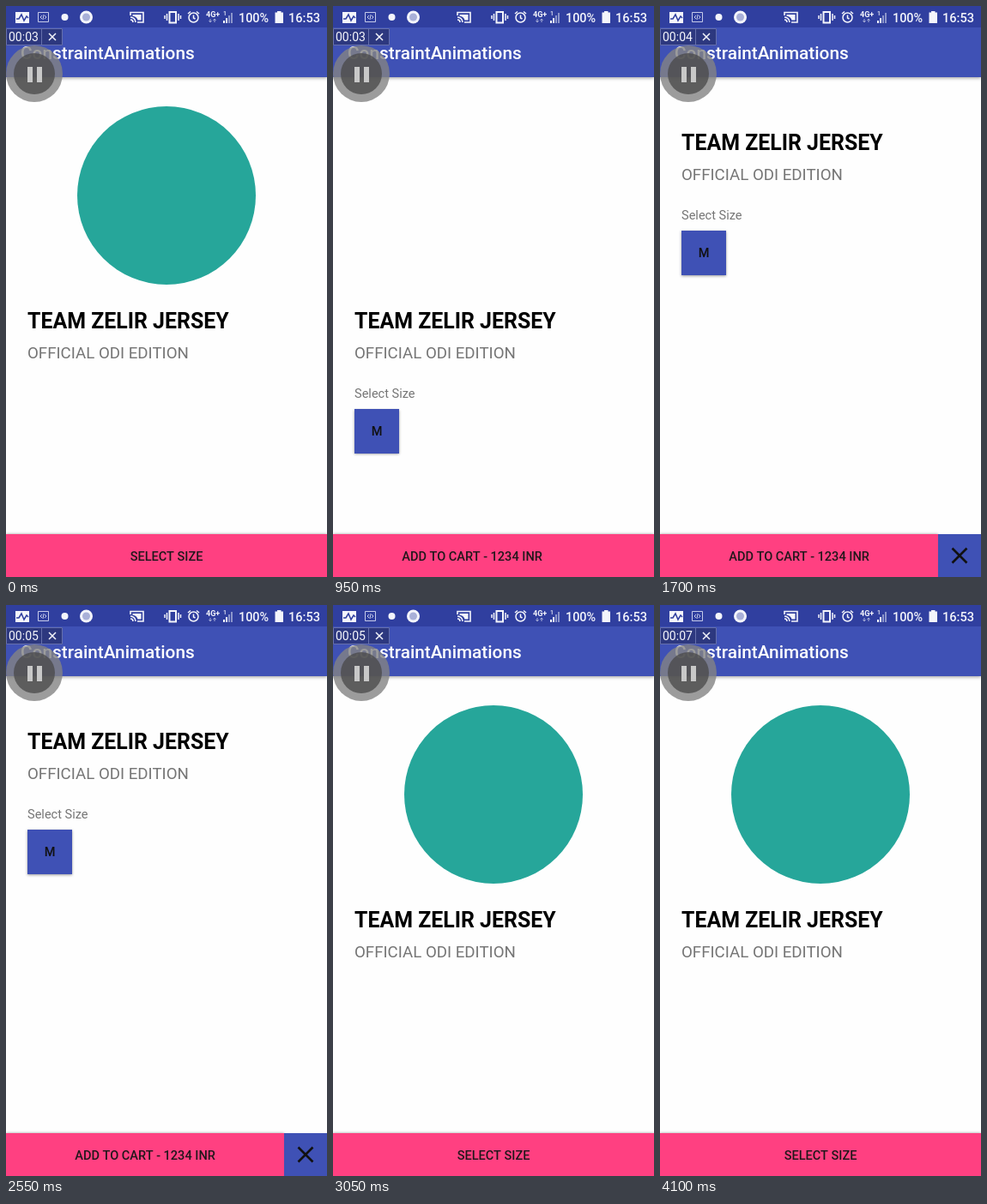
Animation, 374 px wide and 666 px high, one loop 4300 ms. Source, as an HTML page with a canvas:

```html
<!DOCTYPE html>
<html lang="en">
<head>
<meta charset="utf-8">
<title>Constraint animation</title>
<style>
html, body { margin: 0; width: 100%; height: 100%; overflow: hidden; background: #fefefe; }
canvas { display: block; }
</style>
</head>
<body>
<canvas id="stage" width="374" height="666"></canvas>
<script>
const ctx = document.getElementById('stage').getContext('2d');
const LOOP = 4300, MOVE = 300, OPEN_AT = 950, CLOSE_AT = 2640;
const INDIGO = '#3f51b5', PINK = '#ff4081', TEAL = '#26a69a';

// Anticipate-overshoot easing with tension 3
function ease(t) {
  if (t <= 0) return 0;
  if (t >= 1) return 1;
  const u = t < 0.5 ? 2 * t : 2 * t - 2;
  return t < 0.5 ? u * u * (4 * u - 3) / 2 : u * u * (4 * u + 3) / 2 + 1;
}

function rect(x, y, w, h, color) {
  ctx.fillStyle = color;
  ctx.fillRect(x, y, w, h);
}

function disc(x, y, r, color) {
  ctx.fillStyle = color;
  ctx.beginPath();
  ctx.arc(x, y, r, 0, 7);
  ctx.fill();
}

function stroke(path, color, width) {
  ctx.strokeStyle = color;
  ctx.lineWidth = width;
  ctx.stroke(new Path2D(path));
}

function text(s, x, y, size, weight, color, align = 'left') {
  ctx.font = `${weight} ${size}px Roboto, sans-serif`;
  ctx.textAlign = align;
  ctx.fillStyle = color;
  ctx.fillText(s, x, y);
}

function withShadow(blur, dy, draw) {
  ctx.save();
  ctx.shadowColor = 'rgba(0,0,0,.4)';
  ctx.shadowBlur = blur;
  ctx.shadowOffsetY = dy;
  draw();
  ctx.restore();
}

function statusBar() {
  const white = '#f4f5fb', pale = '#a9b0d8', blue = '#303f9f';
  rect(0, 0, 374, 25, blue);
  rect(11, 7, 16, 13, white);
  stroke('M12 15h3l3-5 3 7 3-5 2 2', blue, 1.5);
  stroke('M37.5 7.5h12v11h-12z M42 11l-2 2 2 2 M45 11l2 2-2 2 M44 10l-1 6', '#c5cae9', 1);
  disc(68.5, 13, 4, white);
  disc(93.5, 13, 7.5, white);
  disc(93.5, 13, 4.5, pale);
  stroke('M145 11V7.5h15v11.500h-7 M145 13a6 6 0 0 1 6 6 M145 16a3 3 0 0 1 3 3', white, 1.6);
  ctx.fillStyle = white;
  ctx.fill(new Path2D('M147.500 10h10v6.500h-4q-1-4-6-5z'));
  stroke('M190.5 7h7.500v12.500h-7.500z', white, 2);
  stroke('M187.500 9v8 M201 9v8 M185 11v4 M203.500 11v4', white, 1.5);
  stroke('M224 13.5a5.5 5.5 0 1 1-11 0a5.5 5.5 0 1 1 11 0 M218.5 10.5v3.5l2 1 M212 9l3-2.5 M225 9l-3-2.5', white, 1.5);
  text('4G+', 233, 13, 9, 700, white);
  stroke('M238 15v4 M236.5 17l1.5 2 1.5-2 M243 19v-4 M241.5 17l1.5-2 1.5 2', pale, 1);
  text('1', 253, 11, 7, 500, white);
  for (let i = 0; i < 4; i++) rect(253 + 3 * i, 17 - 3 * i, 2, 3 + 3 * i, i < 2 ? white : '#8c96cb');
  text('100%', 271, 18.5, 14.4, 500, white);
  rect(313.5, 7.5, 9.5, 12.5, white);
  rect(316, 6, 4.5, 2, white);
  text('16:53', 329, 18.5, 14.6, 500, white);
}

function recorder(t) {
  const seconds = 3 + [1050, 2100, 3100, 4100].filter(tick => t >= tick).length;
  disc(33, 79, 33, 'rgba(132,132,132,.8)');
  disc(33, 79, 24, 'rgba(72,72,72,.75)');
  rect(25, 71, 6, 18, '#c8c8c8');
  rect(36, 71, 6, 18, '#c8c8c8');
  rect(0, 26, 66, 20, 'rgba(38,46,105,.7)');
  stroke('M.5 26.5h65v19h-65z M41.5 26v20', '#6670ac', 1);
  text('00:0' + seconds, 3, 41, 14, 400, '#f4f5fb');
  stroke('M50 32l8 8 M58 32l-8 8', '#f4f5fb', 1.5);
}

function draw(t) {
  const open = t >= OPEN_AT && t < CLOSE_AT;
  const shift = ease((t - OPEN_AT) / MOVE) - ease((t - CLOSE_AT) / MOVE);
  const size = 208 * (1 - shift), dy = -208 * shift;
  const split = 374 - 50 * shift;

  rect(0, 0, 374, 666, '#fefefe');
  if (!open && size > 0) disc(187, 117 + size / 2, size / 2, TEAL);

  text('TEAM ZELIR JERSEY', 25, 376 + dy, 24.9, 700, '#000');
  text('OFFICIAL ODI EDITION', 25, 411 + dy, 18.7, 400, '#757575');
  if (open) {
    text('Select Size', 25, 457 + dy, 14.55, 400, '#757575');
    withShadow(3, 1, () => rect(25, 470 + dy, 52, 52, INDIGO));
    text('M', 51, 501 + dy, 14.55, 500, '#111', 'center');
  }

  withShadow(3, 0, () => rect(0, 616, split, 50, PINK));
  text(open ? 'ADD TO CART - 1234 INR' : 'SELECT SIZE', open ? 162 : 187, 646.5, 14.55, 500, '#21171b', 'center');
  if (open && shift > 0) {
    const top = 666 - 50 * shift;
    ctx.save();
    ctx.beginPath();
    ctx.rect(split, top, 50 * shift, 50 * shift);
    ctx.clip();
    rect(split, top, 60, 60, INDIGO);
    ctx.translate(split + 25, top + 25);
    stroke('M-8.5 -8.5L8.5 8.5 M8.5 -8.5L-8.5 8.5', '#111', 2.6);
    ctx.restore();
  }

  withShadow(4, 1, () => rect(0, 25, 374, 58, INDIGO));
  text('ConstraintAnimations', 17, 62, 20.8, 500, '#fff');
  statusBar();
  recorder(t);
}

function tick() {
  draw(performance.now() % LOOP);
  requestAnimationFrame(tick);
}
tick();
</script>
</body>
</html>
```
